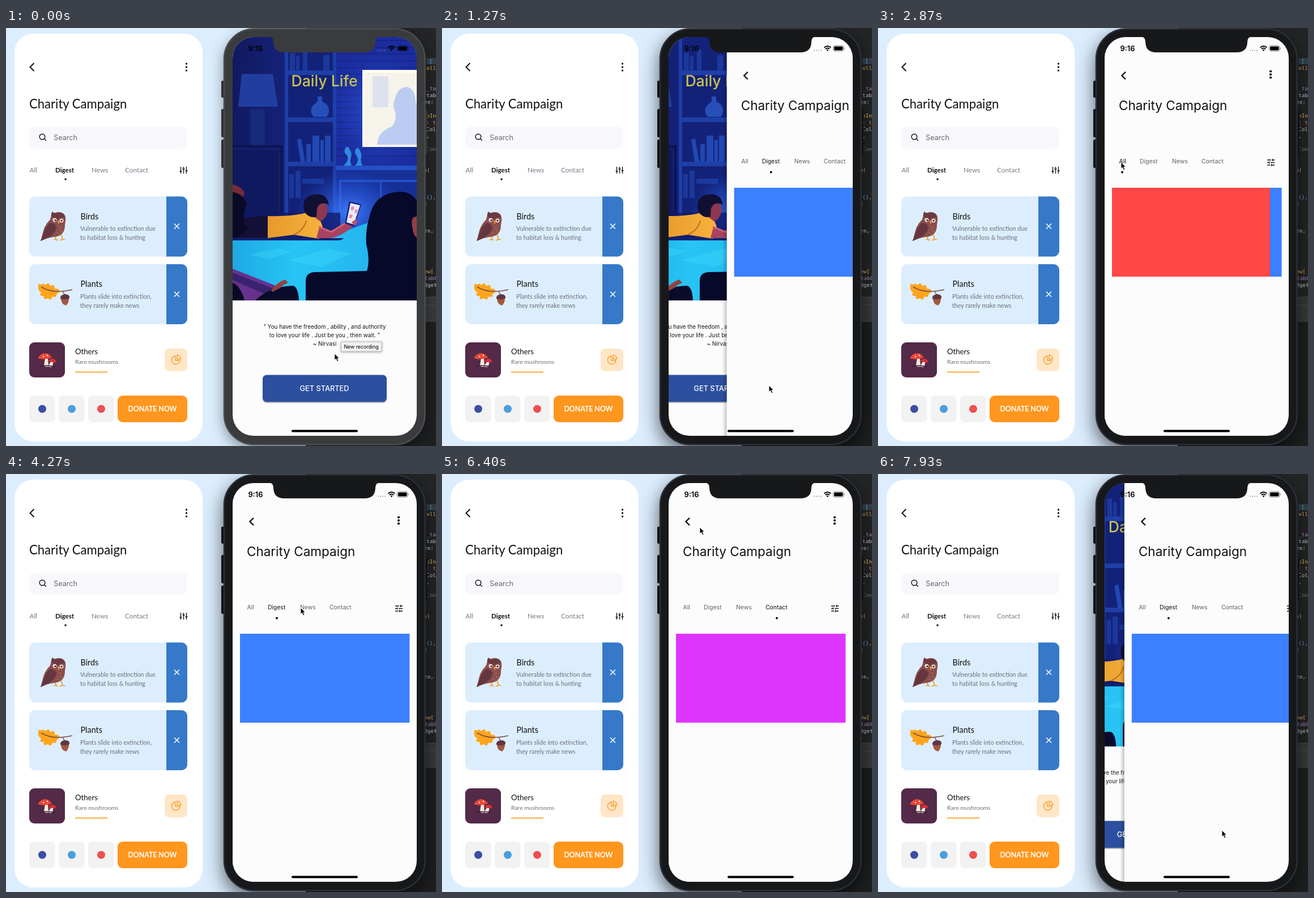
Recreate the animation shown at these times as an HTML page. Size 759 by 738 pixels, loop 8000 ms.

```html
<!DOCTYPE html>
<html lang="en">
<head>
<meta charset="utf-8">
<title>Charity Campaign</title>
<style>
html, body { margin: 0; width: 100%; height: 100%; overflow: hidden; background: #dceefe; }
svg { display: block; }
.lato { font-family: Lato, sans-serif; }
.inter { font-family: Inter, sans-serif; }
.mono { font: 9.4px "DejaVu Sans Mono", monospace; }
.body { font-size: 10.7px; fill: #6c6f7a; }
.mid { text-anchor: middle; }
.line { fill: none; stroke: #111; stroke-width: 2; }
#shell { fill: #17181a; stroke: #2b2f39; filter: drop-shadow(0 13px 17px rgba(0,0,0,.6)); }
#notch, .key { fill: #17181a; }
.idle #shell { fill: #3a3b3d; stroke: #4b4d52; filter: drop-shadow(0 9px 12px rgba(0,0,0,.38)); }
.idle #notch, .idle .key { fill: #3a3b3d; }
</style>
</head>
<body>
<svg id="stage" width="759" height="738" viewBox="0 0 759 738">
<defs>
  <clipPath id="screen"><rect x="400" y="16" width="325" height="704" rx="37"/></clipPath>
  <clipPath id="art"><rect x="400" y="16" width="325" height="465"/></clipPath>
  <linearGradient id="wall"><stop stop-color="#11195f"/><stop offset=".55" stop-color="#172a91"/><stop offset="1" stop-color="#1c2ba0"/></linearGradient>
  <radialGradient id="glow"><stop stop-color="#3f80ff" stop-opacity=".95"/><stop offset="1" stop-color="#2452e0" stop-opacity="0"/></radialGradient>
  <linearGradient id="bed"><stop stop-color="#1fa9e4"/><stop offset=".45" stop-color="#27c5f4"/><stop offset="1" stop-color="#25b4ee"/></linearGradient>
  <linearGradient id="edge"><stop stop-opacity="0"/><stop offset="1" stop-opacity=".22"/></linearGradient>
  <linearGradient id="shirt"><stop stop-color="#e79a2c"/><stop offset="1" stop-color="#f6b23c"/></linearGradient>
</defs>

<rect width="759" height="738" fill="#dceefe"/>

<!-- design card -->
<g class="lato" fill="#111">
  <rect x="15" y="10" width="332" height="720" rx="33" fill="#fff"/>
  <path class="line" d="M49.5 62l-7 7 7 7"/>
  <circle cx="318.5" cy="63" r="1.7"/><circle cx="318.5" cy="69" r="1.7"/><circle cx="318.5" cy="75" r="1.7"/>
  <text x="41" y="142" font-size="22.1">Charity Campaign</text>
  <rect x="41" y="174" width="279" height="39" rx="10" fill="#f8f8fc"/>
  <g class="line" style="stroke-width:1.5"><circle cx="64" cy="192" r="4.8"/><path d="M67.5 195.5l3.3 3.3"/></g>
  <text class="inter" x="84" y="197.5" font-size="12.7" fill="#686a76">Search</text>
  <g font-size="11.8" fill="#777a86">
    <text x="41.5" y="255">All</text><text x="151" y="255">News</text><text x="210" y="255">Contact</text>
    <text x="87" y="255" font-size="11.5" font-weight="bold" fill="#111">Digest</text>
  </g>
  <circle cx="105" cy="267" r="1.8"/>
  <path class="line" style="stroke-width:1.4" d="M308.5 245v12M313.5 245v12M318.5 245v12M306.5 253h4M311.5 249h4M316.5 252h4"/>

  <g id="birds">
    <rect x="41" y="297.5" width="279" height="106" rx="10" fill="#dceefe"/>
    <path d="M283 297.5h27a10 10 0 0 1 10 10v86a10 10 0 0 1-10 10h-27z" fill="#3679c9"/>
    <path d="M297 345.500l9 9M306 345.500l-9 9" stroke="#fff" stroke-width="1.6"/>
    <text x="131.5" y="338" font-size="14.4">Birds</text>
    <text class="body" x="131" y="358">Vulnerable to extinction due</text>
    <text class="body" x="131" y="374">to habitat loss &amp; hunting</text>
    <path d="M87 366l1 7m0 0l-4 1m4-1l3 2M97 364l3 9m0 0l-5 2m5-2l4 1" stroke="#f39a2b" stroke-width="1.8" fill="none"/>
    <path d="M78 338C80 322 103 321 105 334C106 341 104 344 104 349C104 361 97 368 84 369C76 370 69 372 61 376C64 367 65 359 68 352Q72 344 78 338Z" fill="#8b4f4c"/>
    <path d="M79 344C67 351 68 363 61 376C73 372 89 363 89 351Q86 345 79 344Z" fill="#653640"/>
    <path d="M80 333q-1-5 2-9 2 3 7 3 8-3 13 2l2 5-8 1-5 3z" fill="#6b3a42"/>
    <circle cx="86" cy="339" r="3.4" fill="#f2ded6"/><circle cx="98" cy="340" r="3.400" fill="#f2ded6"/>
    <circle cx="87" cy="339.500" r="1.500" fill="#22162a"/><circle cx="98" cy="340" r="1.500" fill="#22162a"/>
    <path d="M91 340l4 1-2 6z" fill="#f0a23c"/>
    <path d="M93 351l2 2 2-2M95 357l2 2 2-2M89 361l2 2 2-2" stroke="#b77268" fill="none"/>
  </g>

  <g id="plants">
    <rect x="41" y="417" width="279" height="106" rx="10" fill="#dceefe"/>
    <path d="M283 417h27a10 10 0 0 1 10 10v86a10 10 0 0 1-10 10h-27z" fill="#3679c9"/>
    <path d="M297 465.5l9 9M306 465.5l-9 9" stroke="#fff" stroke-width="1.6"/>
    <text x="131.5" y="457" font-size="14.4">Plants</text>
    <text class="body" x="131" y="477.5">Plants slide into extinction,</text>
    <text class="body" x="131" y="493.5">they rarely make news</text>
    <path d="M57 455Q56 450 63 453Q66 449 69 454Q76 447 78 456Q86 450 86 460Q96 460 94 466Q91 469 89 470Q90 477 82 474Q80 483 74 477Q65 482 67 473Q57 474 62 467Q55 462 57 455Z" fill="#ffa51c"/>
    <path d="M62 457Q82 470 117 462M100 465l4 7" stroke="#7b4a42" stroke-width="1.5" fill="none"/>
    <path d="M97 477Q97 488 106 490Q112 484 111 475Z" fill="#a4583d"/>
    <path d="M96 478Q95 471 104 470Q113 470 112 477Q104 481 96 478Z" fill="#613641"/>
  </g>

  <rect x="41" y="555" width="63" height="62" rx="9" fill="#532a48"/>
  <path d="M69 583l-2 13q4 4 8 1l-1-14zM80 588l-6 9q5 3 8 0l2-9z" fill="#f5e7dd"/>
  <path d="M56 583Q61 574 70 574Q77 575 81 582Q68 587 56 583Z" fill="#ef4637"/>
  <path d="M75 588Q79 583 84 584Q89 586 88 590Q81 591 75 588Z" fill="#d93032"/>
  <circle cx="66" cy="580" r="1.2" fill="#fff"/><circle cx="73" cy="578" r="1.2" fill="#fff"/>
  <path d="M59 598q10-4 28 0" stroke="#3d1d38" stroke-width="1.5" fill="none"/>
  <text x="122" y="575.5" font-size="13.2">Others</text>
  <text x="122" y="593" font-size="10.4" fill="#6c6f7a">Rare mushrooms</text>
  <path d="M122 607.5h57" stroke="#f2aa38" stroke-width="2"/>
  <rect x="280" y="566" width="40" height="40" rx="8" fill="#ffe6c7"/>
  <path d="M299 579a7.3 7.3 0 1 0 8 8h-8zM302 577.5v7h6.5a6.8 6.8 0 0 0-6.5-7z" fill="none" stroke="#f7a031" stroke-width="1.5"/>
  <g fill="#f2f2f3"><rect x="41" y="649" width="45.5" height="47" rx="8"/><rect x="93" y="649" width="45.5" height="47" rx="8"/><rect x="145" y="649" width="45.5" height="47" rx="8"/></g>
  <circle cx="64" cy="672.5" r="7" fill="#3a4fa3"/><circle cx="116" cy="672.5" r="7" fill="#4a9ede"/><circle cx="168" cy="672.5" r="7" fill="#ee4f50"/>
  <rect x="197" y="649" width="123" height="47" rx="9" fill="#ff961e"/>
  <text class="mid" x="258.5" y="676.5" font-size="12.3" font-weight="bold" fill="#fff">DONATE NOW</text>
</g>

<!-- editor -->
<rect x="529" width="230" height="738" fill="#242526"/>
<rect x="529" y="475" width="230" height="43" fill="#393a3c"/>
<rect x="529" y="518" width="230" height="220" fill="#1e1f20"/>
<path d="M529 475h230M529 489h230M529 518h230" stroke="#4b4c4e"/>
<rect x="742" y="53" width="17" height="11" fill="#33424d"/>
<g id="code" class="mono"></g>

<!-- phone -->
<g id="phone">
  <path class="key" d="M380 95q0-2 2-2h5v30h-5q-2 0-2-2zM380 145q0-2 2-2h5v50h-5q-2 0-2-2zM380 199q0-2 2-2h5v50h-5q-2 0-2-2zM738 145h4q2 0 2 2v74q0 2-2 2h-4z"/>
  <rect id="shell" x="385" y="1.5" width="354.5" height="734" rx="53" stroke-width="2.5"/>
  <g clip-path="url(#screen)">
    <g id="home">
      <rect x="400" y="16" width="325" height="704" fill="#fcfcfc"/>
      <g clip-path="url(#art)">
        <rect x="400" y="16" width="325" height="465" fill="url(#wall)"/>
        <path d="M416 81h55l9 58h-70z" fill="#213d9f"/>
        <path d="M431 143h26v64h-26z" fill="#172a7b"/>
        <path d="M400 208h87v120h-87z" fill="#0f195f" stroke="#0a1148" stroke-width="2"/>
        <path d="M400 214h82v112" fill="none" stroke="#1a2c82"/>
        <!-- shelves -->
        <path d="M492 16h91v320h-91z" fill="#132279"/>
        <path d="M492 16h6v320h-6zM577 16h6v320h-6zM492 75h91v8h-91zM492 158h91v8h-91zM492 236h91v8h-91z" fill="#1f3fa8"/>
        <g fill="#1b389b">
          <path d="M501 44h9v31h-9zM512 50h6v25h-6zM524 38h8v37h-8zM560 48h11v27h-11z"/>
          <path d="M550 121h8v5q-2 4 6 7q11 11 2 24h-23q-10-13 2-23q6-4 5-8z" fill="#264fb8"/>
          <path d="M514 197l7-2 7 41h-8zM530 205h8v31h-8zM541 190h12v46h-12zM555 198h6v38h-6zM563 190h10v46h-10z" fill="#2148b3"/>
          <path d="M500 258h8v42h-8zM511 252h9v48h-9zM523 266h38v9h-38z"/>
        </g>
        <!-- window wall and console -->
        <path d="M583 16h142v227h-142z" fill="#1b2c9e"/>
        <path d="M583 22h142M583 34h142M583 46h142M583 58h142M583 70h142M583 82h47M583 94h47M583 106h47M583 118h47M583 130h47M583 142h47M583 154h47M583 166h47M583 178h47M583 190h47M583 202h47M583 214h142M583 226h142" stroke="#182587" stroke-width="2"/>
        <ellipse cx="660" cy="145" rx="90" ry="110" fill="url(#glow)" opacity=".55"/>
        <path d="M629 74h96v136h-96z" fill="#fffdf0"/>
        <path d="M633 79h92v127h-92z" fill="#f6f3ea"/>
        <path d="M647 85h28v55h-28z" fill="#dde2ee"/>
        <path d="M655 206Q656 183 681 174Q690 165 687 149Q681 137 687 123Q692 105 707 104Q722 106 723 130L725 134V206Z" fill="#bccbf1"/>
        <path d="M583 243h142v90h-142z" fill="#163097"/>
        <path d="M583 243h142v8h-142zM588 268h137v4h-137zM588 268h4v60h-4zM660 272h3v50h-3z" fill="#2450c6"/>
        <path d="M601 210q-7 7 0 14t-5 19h14q-4-8-1-15t-5-18zM619 212q-6 6 0 14t-3 17h13q-4-9-2-15t-5-16z" fill="#2d8be0"/>
        <ellipse cx="606" cy="326" rx="95" ry="75" fill="url(#glow)"/>
        <path d="M400 326h190v50h-190z" fill="#10186a" opacity=".75"/>
        <!-- bed -->
        <path d="M400 373H560L638 344Q645 345 650 380V481H400Z" fill="url(#bed)"/>
        <path d="M400 371h196q-3 4-12 4H400z" fill="#0c2370"/>
        <path d="M497 410l72-20 40 8-52 24zM430 400l50-11 25 5-40 14z" fill="#43dcfb" opacity=".3"/>
        <!-- reader -->
        <path d="M400 342Q432 330 470 332L472 371H400Z" fill="#151037"/>
        <path d="M462 332Q506 333 531 326Q554 329 559 352L552 372L508 365L462 371Z" fill="url(#shirt)"/>
        <path d="M508 365q18-8 22-25" stroke="#b9711f" stroke-width="2" fill="none"/>
        <path d="M553 352Q573 368 602 341L613 340L615 348Q592 369 571 371L548 371Z" fill="#a84362"/>
        <path d="M552 351l22 9 29-18" stroke="#d35e76" stroke-width="3" fill="none"/>
        <path d="M542 317Q556 304 566 312L568 322Q565 338 554 341L543 333Z" fill="#8d3851"/>
        <path d="M527 325Q520 302 538 295Q566 288 570 312Q555 305 549 318L548 333Q536 337 527 325Z" fill="#101033"/>
        <path d="M606 306l21 5-12 40-17-6z" fill="#17217a"/>
        <path d="M608 309l17 4-11 34-13-4z" fill="#e9eaff"/>
        <path d="M610 315l5 1-2 6-5-1zM617 320l4 1-2 6-4-1zM607 329l5 1-2 6-5-1z" fill="#e889ae"/>
        <path d="M610 343l8-6 2 6-5 6z" fill="#c25069"/>
        <!-- foreground figures -->
        <path d="M400 276Q415 279 421 291L413 317L400 321Z" fill="#762b38"/>
        <path d="M400 290Q417 291 425 310Q414 340 427 355L410 369H400Z" fill="#090a27"/>
        <path d="M400 425L486 459L477 481H400Z" fill="#66328e"/>
        <path d="M400 432L479 463L471 476L400 445Z" fill="#39236f"/>
        <path d="M400 450Q414 455 421 481H400Z" fill="#080923"/>
        <path d="M440 481Q465 456 507 455Q516 458 517 481Z" fill="#0a0b2a"/>
        <path d="M468 463q12-15 25-19l5 6q-11 4-14 9l-14 7z" fill="#91423f"/>
        <path d="M529 481V447Q529 431 546 431L637 429Q643 410 636 382Q634 358 641 335Q650 291 694 289Q717 289 725 306V481Z" fill="#07092a"/>
        <path d="M725 333Q714 332 717 350Q719 367 725 370Z" fill="#933e42"/>
      </g>
      <text class="inter mid" x="562" y="102.5" font-size="26.6" font-weight="500" fill="#c9c34c">Daily Life</text>
      <g class="inter mid" font-size="9.9" fill="#161616">
        <text x="562.5" y="531">" You have the freedom , ability , and authority</text>
        <text x="562.5" y="546">to love your life . Just be you , then wait. "</text>
        <text x="562.5" y="561">~ Nirvasi</text>
      </g>
      <rect x="453" y="614" width="219" height="48" rx="7" fill="#000" opacity=".3"/>
      <rect x="453" y="612.5" width="219" height="47.5" rx="7" fill="#2c4f9f"/>
      <text class="inter mid" x="562" y="641" font-size="12.8" font-weight="500" fill="#fff">GET STARTED</text>
    </g>
    <g id="page">
      <rect x="392" y="16" width="8" height="704" fill="url(#edge)"/>
      <rect x="400" y="16" width="326" height="704" fill="#fcfcfc"/>
      <path class="line" style="stroke-width:2.4" d="M437 77.5l-6.5 6.5 6.5 6.5"/>
      <circle cx="693" cy="76.5" r="2.1"/><circle cx="693" cy="82" r="2.1"/><circle cx="693" cy="87.5" r="2.1"/>
      <text class="inter" x="425" y="145" font-size="22.5" fill="#111">Charity Campaign</text>
      <g id="tabs" class="inter" font-size="10.4"></g>
      <circle id="dot" cy="254.5" r="1.9"/>
      <path class="line" style="stroke-width:1.4" d="M687 233h7M697 233h3M687 237.5h3M693 237.5h7M687 242h5M695 242h5M696.5 231v4M690.5 235.5v4M694.5 240v4"/>
      <svg x="413" y="282" width="299.5" height="157"><g id="panels"></g></svg>
    </g>
    <g>
      <text class="inter" x="427.5" y="41" font-size="12.9" font-weight="600">9:16</text>
      <path d="M656 39.5h15" stroke="#888" stroke-opacity=".6" stroke-width="2" stroke-dasharray="2 2"/>
      <path d="M674.5 34.5q6-5 12 0M676.8 37q3.7-3 7.4 0" fill="none" stroke="#000" stroke-width="1.9"/>
      <path d="M678.5 38.7q2-1.6 4 0l-2 2.2z"/>
      <rect x="690.5" y="31" width="18.5" height="10" rx="3" fill="none" stroke="#000" stroke-opacity=".45"/>
      <rect x="692" y="32.5" width="15.5" height="7" rx="1.7"/><path d="M710 34.5v3" stroke="#000" stroke-opacity=".5"/>
      <rect x="504" y="709.5" width="117" height="4" rx="2"/>
    </g>
  </g>
  <path id="notch" d="M464 15q8 1 8 9q0 19 19 19H633q19 0 19-19q0-8 8-9z"/>
</g>

<g id="tip">
  <rect x="591.5" y="554" width="71.5" height="17" fill="#f1f1f1" stroke="#b8b8b8" style="filter:drop-shadow(0 1px 2px #0005)"/>
  <text class="inter mid" x="627" y="565.5" font-size="8.8">New recording</text>
</g>
<path id="cursor" d="M0 0v11.5l2.6-2.4 2 4.7 2.2-1-2-4.5h3.5z" stroke="#fff" stroke-width=".9"/>
</svg>
<script>
const LOOP = 8000, SCREEN_W = 325, PANEL_W = 299.5;
const $ = id => document.getElementById(id);
const mix = (a, b, k) => a + (b - a) * k;
const clamp = k => Math.min(1, Math.max(0, k));

// CSS-style cubic timing curve, solved by bisection.
function bezier(x1, y1, x2, y2) {
  const at = (a, b, s) => 3 * (1 - s) ** 2 * s * a + 3 * (1 - s) * s * s * b + s ** 3;
  return x => {
    if (x <= 0 || x >= 1) return clamp(x);
    let lo = 0, hi = 1;
    for (let i = 0; i < 24; i++) {
      const s = (lo + hi) / 2;
      if (at(x1, x2, s) < x) lo = s; else hi = s;
    }
    return at(y1, y2, lo);
  };
}
const ease = bezier(.25, .1, .25, 1);
const slide = bezier(.35, .91, .33, .97);
const glide = bezier(.4, 0, .3, 1);

const tabs = [
  ['All', 425.5, 431, '#ff4848'], ['Digest', 462, 478, '#3b80ff'],
  ['News', 519, 532, '#5cf0a8'], ['Contact', 571, 591, '#de35fe']
];
$('tabs').innerHTML = tabs.map(([label, x]) => `<text x="${x}" y="239">${label}</text>`).join('');
$('panels').innerHTML = tabs.map(([, , , color], i) =>
  `<rect x="${i * PANEL_W}" width="${PANEL_W + .3}" height="157" fill="${color}"/>`).join('');

$('code').innerHTML = [
  [62, '[', '#5db6e8', 5], [74, 'olle', '#e6bd68'], [110, '_ta', '#b18bc4'], [122, 'tab', '#c9ced6'],
  [134, 'ze:', '#c9ced6', -4], [158, 'bIn', '#e6bd68'], [170, ': t', '#d98243'], [182, 'Col', '#c9ced6'],
  [194, ',', '#c9ced6'], [217, 'Con', '#77797c'], [254, 'n(', '#e6bd68', -5], [302, '{},', '#6fa6d8'],
  [314, ')', '#77797c', -3], [361, 'ze,', '#c9ced6', -4], [433, 'ew[', '#e6bd68', -4],
  [445, 'tabC', '#b18bc4', -3], [457, 'dget', '#c9ced6', -4]
].map(([y, text, color, dx = 0]) => `<text x="${742 + dx}" y="${y}" fill="${color}">${text}</text>`).join('');

const FOCUS = 930;
const pageMoves = [[1159, 1], [6600, 0], [7750, 1]];
const tabMoves = [[2667, 0], [3480, 1], [4400, 2], [5280, 3], [7200, 1]];
const cursorPath = [
  [0, 580, 575], [450, 580, 575], [850, 577, 631], [1600, 577, 631], [2450, 429, 237], [2950, 429, 237],
  [3350, 474, 237], [3700, 474, 237], [4200, 520, 236], [4550, 520, 236], [5100, 583, 237],
  [5600, 583, 237], [6400, 455, 94], [6540, 435, 85], [6680, 435, 85], [7150, 560, 638],
  [7280, 560, 638], [7580, 607, 629], [8000, 607, 629]
];

function follow(moves, start, t, duration, curve) {
  return moves.reduce((value, [at, goal]) => mix(value, goal, curve(clamp((t - at) / duration))), start);
}

function cursorAt(t) {
  const i = cursorPath.findIndex(key => key[0] > t);
  const [t0, x0, y0] = cursorPath[i - 1], [t1, x1, y1] = cursorPath[i];
  const k = glide((t - t0) / (t1 - t0));
  return [mix(x0, x1, k), mix(y0, y1, k)];
}

function move(id, x, y = 0) {
  $(id).setAttribute('transform', `translate(${x} ${y})`);
}

function draw(now) {
  const t = now % LOOP;
  const open = follow(pageMoves, 0, t, 400, slide);
  move('home', -open * SCREEN_W / 3);
  move('page', (1 - open) * SCREEN_W);
  $('page').style.display = open > 0 ? '' : 'none';

  move('panels', -PANEL_W * follow(tabMoves, 1, t, 300, ease));
  const position = follow(tabMoves, 1, t + 80, 300, ease);
  const left = Math.min(2, Math.floor(position));
  $('dot').setAttribute('cx', mix(tabs[left][2], tabs[left + 1][2], position - left));
  [...$('tabs').children].forEach((label, i) =>
    label.setAttribute('fill', Math.round(position) === i ? '#111' : '#626262'));

  $('phone').classList.toggle('idle', t < FOCUS);
  $('tip').style.display = t < 500 ? '' : 'none';
  move('cursor', ...cursorAt(t));
}

const start = performance.now();
function tick() {
  draw(performance.now() - start);
  requestAnimationFrame(tick);
}
tick();
</script>
</body>
</html>
```
